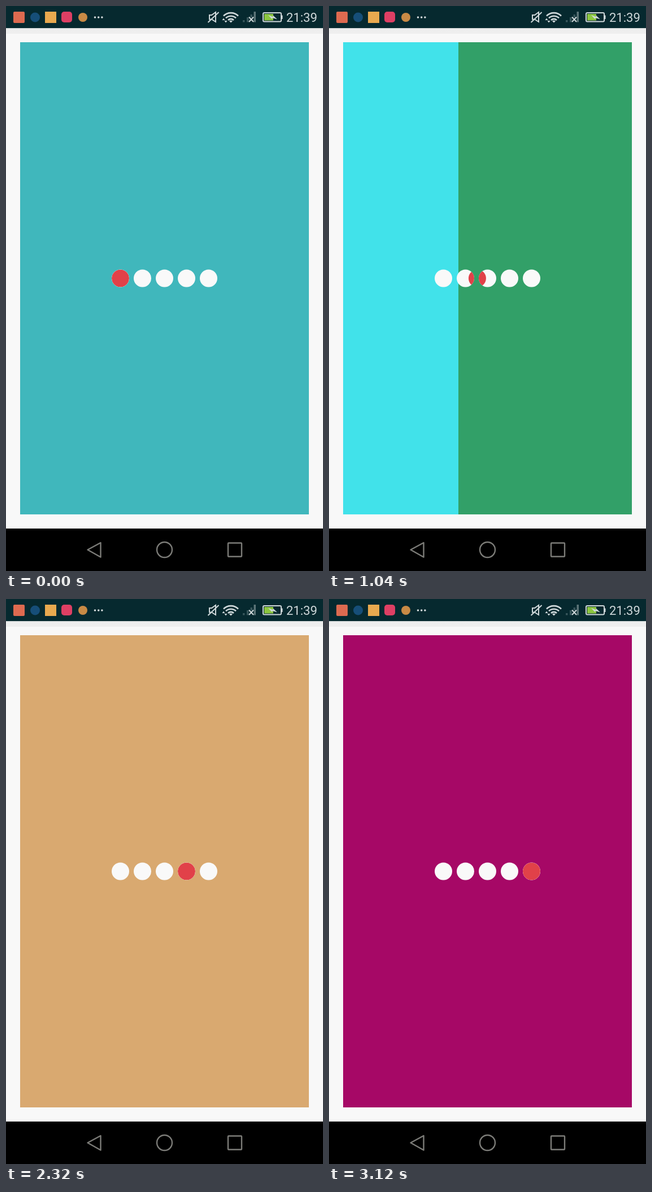
An HTML page for the animation above (3360 ms loop, 561 px wide and 998 px high).

```html
<!DOCTYPE html>
<html lang="en">
<head>
<meta charset="utf-8">
<title>Pager with dot indicator</title>
<style>
  html, body { margin: 0; width: 100%; height: 100%; overflow: hidden; background: #f8f8f8; }
  svg { display: block; width: 561px; height: 998px; }
  .clock { font: 22px Roboto, "Liberation Sans", sans-serif; fill: #cfd8da; }
  .line { fill: none; stroke: #cfd8da; stroke-width: 2; }
  .nav { fill: none; stroke: #7c7c78; stroke-width: 2.4; stroke-linejoin: round; }
</style>
</head>
<body>
<svg viewBox="0 0 561 998">
  <defs>
    <linearGradient id="shade" x2="0" y2="1">
      <stop offset="0" stop-color="#d9dddd"/>
      <stop offset=".25" stop-color="#eeeeee"/>
      <stop offset="1" stop-color="#efefef"/>
    </linearGradient>
    <clipPath id="dotClip"></clipPath>
  </defs>

  <rect width="561" height="998" fill="#f8f8f8"/>
  <rect y="39" width="561" height="10" fill="url(#shade)"/>
  <rect width="561" height="39" fill="#06292f"/>

  <g id="notices">
    <rect x="13" y="10" width="20" height="20" rx="2" fill="#dd6a50"/>
    <circle cx="51.5" cy="20" r="8.5" fill="#164e78"/>
    <rect x="69" y="10" width="20" height="20" fill="#e9a94f"/>
    <rect x="98" y="10" width="19" height="19" rx="5" fill="#de3f64"/>
    <circle cx="136" cy="20" r="8" fill="#c98a45"/>
    <g fill="#d5dcdd">
      <circle cx="157.5" cy="20" r="1.8"/>
      <circle cx="163.7" cy="20" r="1.8"/>
      <circle cx="169.9" cy="20" r="1.8"/>
    </g>
  </g>

  <g id="status">
    <path class="line" d="M360 16H364L371 11V28L364 23.5H360ZM357.5 29L376.5 11"/>
    <g class="line" stroke-width="2.4">
      <path d="M385 17.5A18.5 18.5 0 0 1 411 17.5M389 21.3A13 13 0 0 1 407 21.3M393 25A7 7 0 0 1 403 25" style="stroke-width:2.6"/>
    </g>
    <path fill="#cfd8da" d="M395 26.5Q398 24.5 401 26.5L398 29.5ZM382.5 25L385 21.5L387.5 25ZM386.5 26L391.5 26L389 29.5Z"/>
    <path fill="#38565b" d="M419 25h3.5v3.5h-3.5zM426 20h3.5v8.500h-3.500zM432.500 15h3.500v5h-3.500z"/>
    <path fill="#5d7578" d="M438.500 10h3.500v18.500h-3.500z"/>
    <path class="line" d="M430 19.500L438 28M438 19.500L430 28"/>
    <rect class="line" x="455" y="12" width="32" height="15.500" rx="2"/>
    <rect x="457" y="14" width="16" height="11.500" fill="#8cc63f"/>
    <path fill="#cfd8da" d="M487 16.500h2.500v6.500h-2.500zM464 16L472 19L473 17L480 23.500L471.500 21L470.500 23Z"/>
    <text class="clock" x="496" y="28">21:39</text>
  </g>

  <rect id="left" x="25" y="64" width="511" height="834"/>
  <rect id="right" x="25" y="64" width="511" height="834"/>
  <g id="dots" fill="#f9f9f9"></g>
  <g clip-path="url(#dotClip)"><circle id="marker" cy="481" r="15.5" fill="#e14149"/></g>

  <rect y="923" width="561" height="75" fill="#000"/>
  <path class="nav" d="M144.500 960.500L167.500 948V973.500Z"/>
  <circle class="nav" cx="280.500" cy="960.500" r="13.500"/>
  <rect class="nav" x="393" y="948.500" width="24" height="24" rx="1"/>
</svg>

<script>
  const LOOP = 3360, STEP = 80, SLOT = 800;
  const SETTLE = 750, LAG = 19;
  const PANEL = { x: 25, width: 511 };
  const DOT = { x: 202.5, gap: 39 };
  const colors = ['#40b7bc', '#41e2ea', '#32a068', '#d9a970', '#a60866'];
  const flings = [61, 914, 1710, 2525];

  const get = id => document.getElementById(id);
  const left = get('left'), right = get('right'), marker = get('marker');
  const clamp = v => Math.min(1, Math.max(0, v));

  colors.forEach((_, i) => {
    for (const parent of ['dots', 'dotClip']) {
      const dot = document.createElementNS('http://www.w3.org/2000/svg', 'circle');
      dot.setAttribute('cx', DOT.x + i * DOT.gap);
      dot.setAttribute('cy', 481);
      dot.setAttribute('r', 15.5);
      get(parent).append(dot);
    }
  });

  // Short drag, then a quintic settle
  function progress(i, t) {
    const drag = 0.06 * clamp((t - i * SLOT) / 110);
    const settle = 1 - (1 - clamp((t - flings[i]) / SETTLE)) ** 5;
    return Math.max(drag, settle);
  }

  function draw(t) {
    const page = Math.min(flings.length - 1, Math.floor(t / SLOT));
    const edge = Math.round(PANEL.width * (1 - progress(page, t)));
    left.setAttribute('fill', colors[page]);
    right.setAttribute('fill', colors[page + 1]);
    right.setAttribute('x', PANEL.x + edge);
    right.setAttribute('width', PANEL.width - edge);
    // The marker trails the page by one screen refresh
    marker.setAttribute('cx', DOT.x + DOT.gap * (page + progress(page, t - LAG)));
  }

  const start = performance.now();
  function tick() {
    const t = (performance.now() - start) % LOOP;
    draw(Math.floor(t / STEP) * STEP);
    requestAnimationFrame(tick);
  }
  tick();
</script>
</body>
</html>
```
